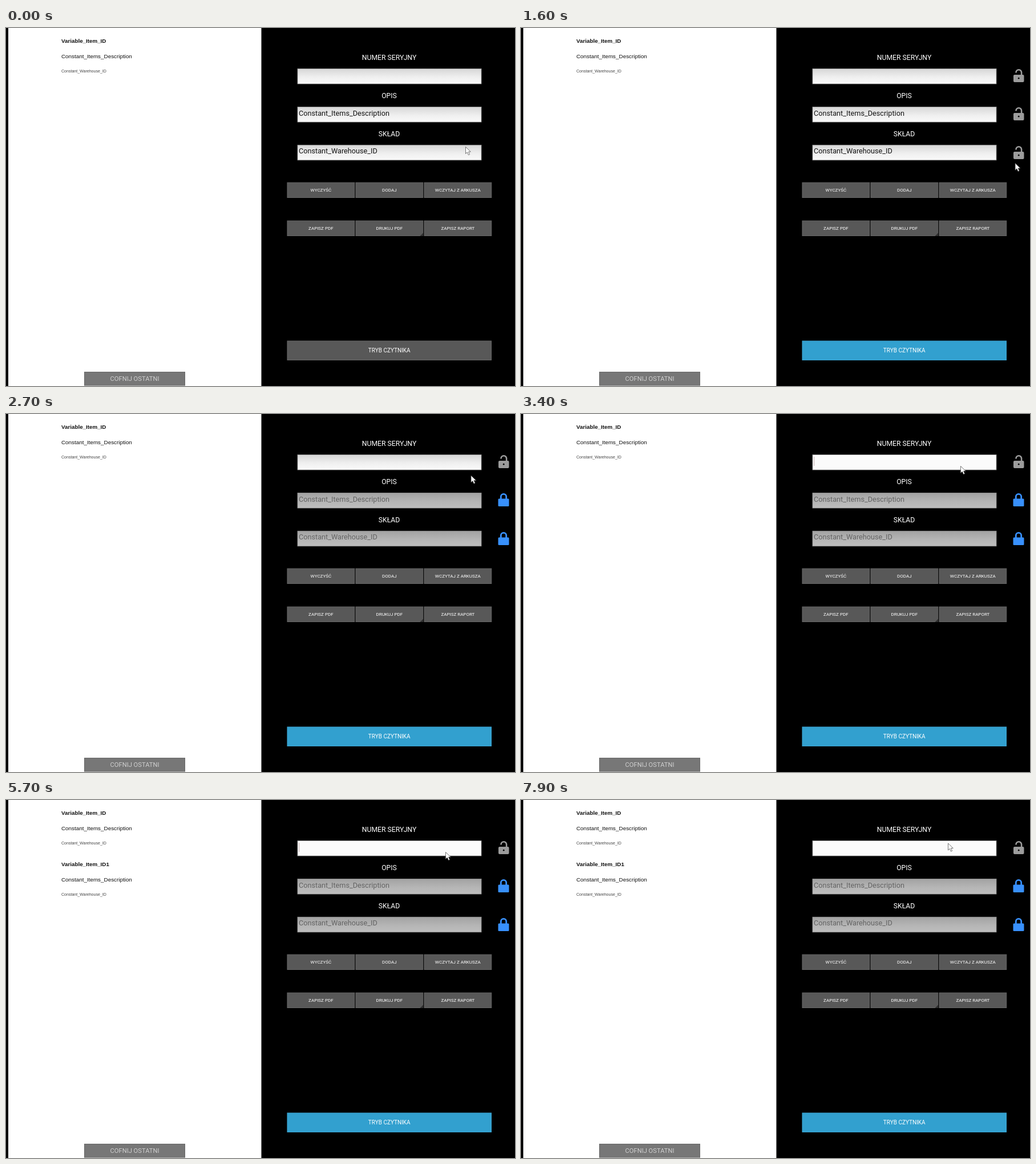
Recreate the animation shown at these times as an HTML page. Size 892 by 628 pixels, loop 8000 ms.

```html
<!DOCTYPE html>
<html lang="pl">
<head>
<meta charset="utf-8">
<title>Etykiety</title>
<style>
  html, body { margin: 0; width: 100%; height: 100%; overflow: hidden; background: #000; }
  svg { display: block; width: 892px; height: 628px; }
  text { font-family: Roboto, sans-serif; }
  .label text { font-family: "Liberation Sans", Arial, sans-serif; fill: #111; }
  .mid { text-anchor: middle; fill: #fff; }
</style>
</head>
<body>
<svg id="stage" viewBox="0 0 892 628">
  <defs>
    <linearGradient id="open" x2="0" y2="1">
      <stop offset="0" stop-color="#d6d6d6"/><stop offset=".55" stop-color="#efefef"/><stop offset="1" stop-color="#fafafa"/>
    </linearGradient>
    <linearGradient id="locked" x2="0" y2="1">
      <stop offset="0" stop-color="#a2a2a2"/><stop offset=".55" stop-color="#b5b5b5"/><stop offset="1" stop-color="#bebebe"/>
    </linearGradient>
  </defs>
  <rect width="892" height="628"/>
  <rect x="4" width="443.5" height="628" fill="#fff"/>
</svg>
<script>
const LOOP = 8000, STEP = 100;
const stage = document.getElementById('stage');

function add(tag, attrs, parent = stage, content = '') {
  const node = document.createElementNS('http://www.w3.org/2000/svg', tag);
  for (const key in attrs) node.setAttribute(key, attrs[key]);
  node.textContent = content;
  parent.appendChild(node);
  return node;
}

const show = (node, on) => node.setAttribute('display', on ? 'inline' : 'none');

function caption(x, y, size, content, fill = '#fff') {
  return add('text', { x, y, 'font-size': size, class: 'mid', style: `fill:${fill}` }, stage, content);
}

function button(x, y, width, height, size, content, fill = '#585858', ink = '#fff') {
  const face = add('rect', { x: x + .5, y: y + .5, width: width - 1, height: height - 1, fill, stroke: '#686868' });
  caption(x + width / 2, y + height / 2 + size * .36, size, content, ink);
  return face;
}

function itemLabel(top, id) {
  const group = add('g', { class: 'label', transform: `translate(97 ${top})` });
  add('text', { y: 26, 'font-size': 9.8, 'font-weight': 700 }, group, id);
  add('text', { y: 53, 'font-size': 9.87 }, group, 'Constant_Items_Description');
  add('text', { y: 77.5, 'font-size': 7.05, style: 'fill:#444' }, group, 'Constant_Warehouse_ID');
  return group;
}

function padlock(top) {
  const open = add('g', { transform: `translate(862.5 ${top})` });
  add('path', { d: 'M5 6.5V6a4.7 4.7 0 0 1 9.6 0V11', fill: 'none', stroke: '#9c9c9c', 'stroke-width': 2.6 }, open);
  add('rect', { x: .5, y: 10, width: 18.5, height: 13, rx: 2, fill: '#9c9c9c' }, open);
  add('circle', { cx: 9.7, cy: 16.2, r: 1.4 }, open);
  const closed = add('g', { transform: `translate(862.5 ${top})` });
  add('path', { d: 'M4.8 11V6a4.7 4.7 0 0 1 9.4 0V11', fill: 'none', stroke: '#3890fc', 'stroke-width': 2.8 }, closed);
  add('rect', { x: 0, y: 9.5, width: 19, height: 13.5, rx: 1.5, fill: '#3890fc' }, closed);
  return { open, closed };
}

function field(top, title, value, lockTop) {
  caption(671.5, top - 14.7, 12.2, title);
  const box = add('rect', { x: 511, y: top + .5, width: 322, height: 26.5, stroke: '#999', 'stroke-width': .8 });
  const text = add('text', { x: 513, y: top + 15.5, 'font-size': 12.7 }, stage, value);
  const lock = padlock(lockTop);
  return (locked, reader, focused) => {
    box.setAttribute('fill', locked ? 'url(#locked)' : focused ? '#fbfbfb' : 'url(#open)');
    text.setAttribute('fill', locked ? '#646464' : '#151515');
    show(lock.open, reader && !locked);
    show(lock.closed, reader && locked);
    return text;
  };
}

itemLabel(0, 'Variable_Item_ID');
const secondLabel = itemLabel(90, 'Variable_Item_ID1');
button(137, 603, 177, 24.5, 11.2, 'COFNIJ OSTATNI', '#777', '#d0d0d0');

const serial = field(71, 'NUMER SERYJNY', '', 72);
const description = field(138, 'OPIS', 'Constant_Items_Description', 139);
const warehouse = field(204.8, 'SKŁAD', 'Constant_Warehouse_ID', 207);

[['WYCZYŚĆ', 'DODAJ', 'WCZYTAJ Z ARKUSZA'], ['ZAPISZ PDF', 'DRUKUJ PDF', 'ZAPISZ RAPORT']].forEach((row, r) =>
  row.forEach((name, c) => button(492.5 + 120 * c, 270.7 + 67 * r, 118.7, 27.3, 8, name)));
add('path', { d: 'M731 359.5V365H725.5Z', fill: '#303030' });
const reader = button(492.5, 548.5, 358.5, 34.5, 10, 'TRYB CZYTNIKA');

const caret = add('rect', { y: 75, width: 1, height: 16, fill: '#c8b4b4' });
const cursor = add('path', {
  d: 'M0 0V12L2.8 9.4 4.9 14.2 7.1 13.2 5 8.6H8.8Z',
  fill: '#fff', stroke: '#555', 'stroke-width': .8, 'stroke-linejoin': 'round'
});

// time, x, y of the pointer tip
const path = [
  [0, 805.5, 208.5], [700, 757, 557], [900, 757, 557], [1700, 871, 223], [1900, 871, 223],
  [2200, 873.5, 156], [2400, 873.5, 156], [2700, 815, 108], [3100, 770.5, 91.5],
  [5700, 770.5, 91.5], [5900, 777, 84], [6200, 748.5, 76]
];

function pointer(t) {
  const next = path.findIndex(p => p[0] > t);
  if (next < 0) return path[path.length - 1].slice(1);
  const [t0, x0, y0] = path[next - 1], [t1, x1, y1] = path[next];
  const u = (t - t0) / (t1 - t0), k = u * u * (3 - 2 * u);
  return [x0 + (x1 - x0) * k, y0 + (y1 - y0) * k];
}

function render(time) {
  const t = Math.floor((time % LOOP) / STEP) * STEP;
  const reading = t >= 700, focused = t >= 3300;
  const filled = t >= 4900 && t < 5700;

  reader.setAttribute('fill', reading ? '#32a0cf' : '#585858');
  reader.setAttribute('stroke', reading ? '#3aa6d4' : '#686868');
  serial(false, reading, focused).textContent =
    filled ? 'Variable_Item_ID' + (t >= 5000 ? '1' : '') : '';
  description(t >= 2300, reading, false);
  warehouse(t >= 1700, reading, false);
  show(secondLabel, t >= 5700);

  const blink = t >= 3400 && Math.floor((t - 3400) / 500) % 2 === 0;
  show(caret, blink || (t >= 5000 && t < 5700));
  caret.setAttribute('x', filled ? 615.5 : 513.3);

  cursor.setAttribute('transform', `translate(${pointer(t)})`);
}

const start = performance.now();
function tick() {
  render(performance.now() - start);
  requestAnimationFrame(tick);
}
tick();
</script>
</body>
</html>
```
